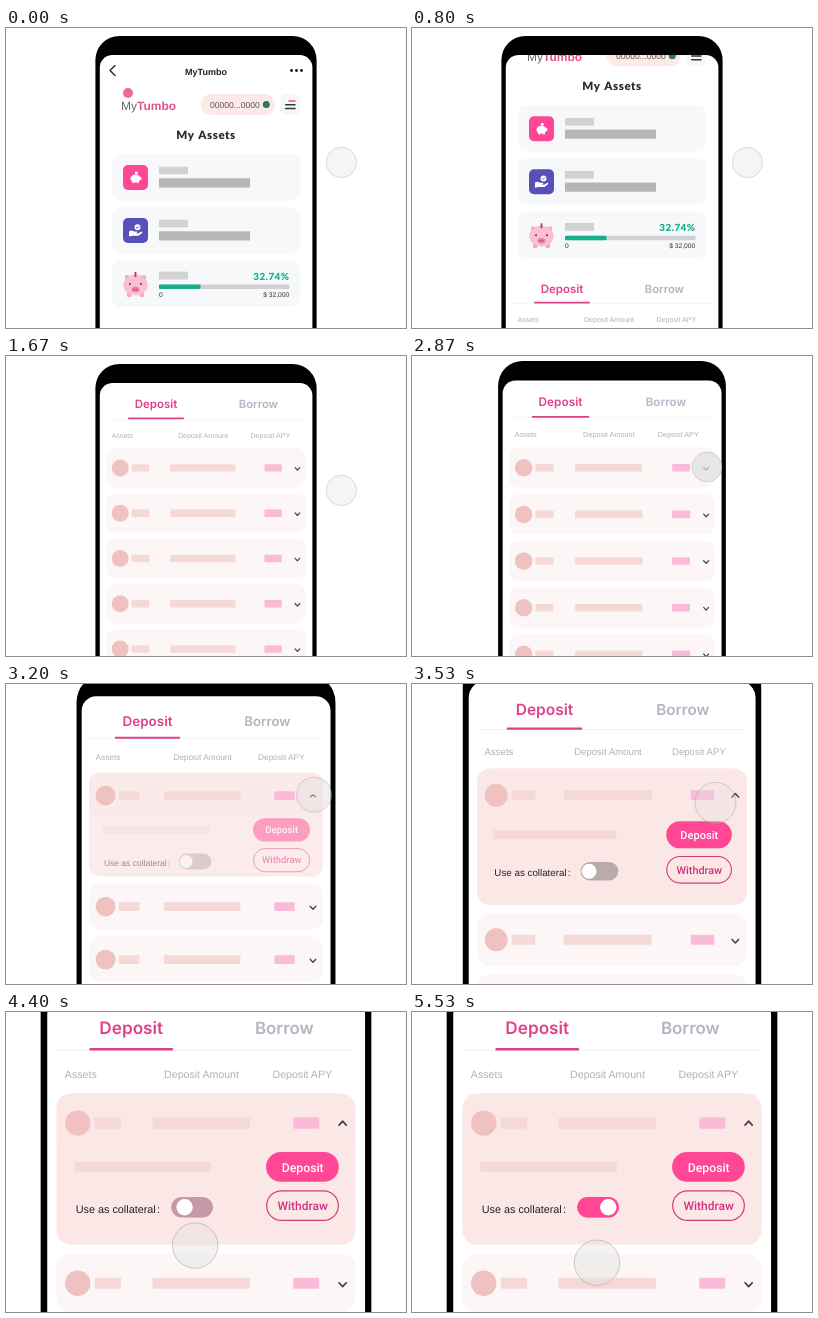
Recreate the animation shown at these times as an HTML page. Size 400x300 px, loop 5.99 s.

```html
<!DOCTYPE html>
<html lang="en">
<head>
<meta charset="utf-8">
<title>Savings app walkthrough</title>
<style>
  html, body { margin: 0; width: 100%; height: 100%; overflow: hidden; background: #fff; }
  svg { display: block; width: 400px; height: 300px; text-rendering: geometricPrecision; }
  text { font-family: "Liberation Sans", Arial, sans-serif; }
  .round { font-family: Lato, sans-serif; font-weight: 900; }
  .tab { font-family: Inter, sans-serif; font-weight: 600; }
  .button { font-family: Roboto, sans-serif; font-weight: 500; }
  .mid { text-anchor: middle; }
  .end { text-anchor: end; }
  .line { fill: none; stroke-linecap: round; stroke-linejoin: round; }
</style>
</head>
<body>
<svg viewBox="0 0 400 300">
  <defs><clipPath id="screen"><rect x="93.800" y="27" width="212.6" height="400" rx="12.5"/></clipPath></defs>
  <g id="camera">
    <rect x="89.4" y="8" width="221.2" height="440" rx="24"/>
    <rect x="93.800" y="27" width="212.6" height="400" rx="12.5" fill="#fff"/>
    <g clip-path="url(#screen)"><g id="page"></g></g>
    <circle id="cursor" stroke="#999" stroke-opacity=".6" stroke-width=".55"/>
  </g>
</svg>
<script>
const $ = id => document.getElementById(id);
const set = (id, attrs) => { for (const k in attrs) $(id).setAttribute(k, attrs[k]); };
const box = (x, y, w, h, fill, r = 0, more = '') =>
  `<rect x="${x}" y="${y}" width="${w}" height="${h}" rx="${r}" fill="${fill}" ${more}/>`;
const dot = (x, y, r, fill) => `<circle cx="${x}" cy="${y}" r="${r}" fill="${fill}"/>`;
const oval = (x, y, rx, ry, fill) => `<ellipse cx="${x}" cy="${y}" rx="${rx}" ry="${ry}" fill="${fill}"/>`;
const text = (x, y, size, fill, str, cls = '', more = '') =>
  `<text x="${x}" y="${y}" font-size="${size}" fill="${fill}" class="${cls}" ${more}>${str}</text>`;
const line = (d, color, w) => `<path class="line" d="${d}" stroke="${color}" stroke-width="${w}"/>`;
const at = (x, y, body, id = '') => `<g id="${id}" transform="translate(${x} ${y})">${body}</g>`;

const PINK = '#ff4796', GREEN = '#14b18a', BOLD = 'font-weight="bold"';
const ROW_H = 39.4, PITCH = 45.3, GROW = 61.8, ROWS = 6;

const header =
  line('M109 37.5l-5 5 5 5', '#222', 1.3) +
  text(200, 47, 9, '#222', 'MyTumbo', 'mid', BOLD) +
  [285.5, 290.5, 295.5].map(x => dot(x, 42.5, 1.4, '#111')).join('') +
  dot(122, 65, 5, '#f06a9f') +
  text(115, 81.5, 12, '#666', `My<tspan fill="#e8508f" ${BOLD}>Tumbo</tspan>`) +
  box(194.5, 66, 74.5, 21, '#fde9e7', 10.5) +
  text(204, 79.6, 8.5, '#555', '00000...0000') +
  dot(260.3, 76.5, 3.5, '#2f7566') +
  box(274.5, 66, 19.5, 21, '#f6f7f9', 5) +
  line('M283 73h6', '#e0508f', 1.5) +
  line('M279.7 76.8h9.3M279.7 80.6h9.3', '#333', 1.5) +
  text(200, 111, 11.5, '#2b2b2b', 'My Assets', 'round mid', 'letter-spacing=".55" word-spacing="1.4"');

const bankIcon = at(129.5, 149.5,
  oval(0, 1, 5, 3.9, '#fff') + dot(.8, -4.6, 1.5, '#fff') +
  box(-3.2, 3, 2, 2.6, '#fff') + box(1.4, 3, 2, 2.6, '#fff') +
  box(3.5, -.5, 2.3, 2.8, '#fff', .6));

const handIcon = at(129.5, 202.5,
  dot(2, -3.2, 3, '#fff') + line('M.8-3.2l1 1 1.6-1.8', '#5650b8', .8) +
  `<path d="M-6.5 1q3-2 5 0h3q1 1-1 1.7l2 .2 3.5-2q1.5 0 .5 1.5l-3.5 2.800h-6l-3.5.8z" fill="#fff"/>`);

const pig = at(129.5, 257,
  `<path d="M-10.500-5l.5-5 5 1zM10.500-5l-.5-5-5 1z" fill="#f4a0b8"/>` +
  box(-8.500, 6, 4.500, 6, '#f4a9bd', 1.5) + box(4, 6, 4.500, 6, '#f4a9bd', 1.5) +
  oval(0, 0, 12.2, 10.4, '#fabfd0') +
  box(-.9, -13, 1.8, 5, '#a53e58', .6) +
  dot(-5.5, -1, 1, '#5b3340') + dot(5.5, -1, 1, '#5b3340') +
  oval(0, 4.5, 3.9, 2.7, '#ee7b9c') + dot(-1.3, 4.5, .7, '#a53e58') + dot(1.3, 4.5, .7, '#a53e58'));

const card = y => box(106, y, 188, 46.5, '#f7f8fa', 9);
const iconCard = (y, color) => card(y) +
  box(117, y + 11, 25, 25, color, 5) +
  box(153, y + 12.7, 29, 7.6, '#d2d2d2') +
  box(153, y + 24.3, 91, 9.2, '#b6b6b6');

const cards =
  iconCard(126, PINK) + bankIcon +
  iconCard(179, '#5650b8') + handIcon +
  card(232.5) + pig +
  box(153, 243.7, 29, 7.8, '#d2d2d2') +
  text(283.5, 252, 9.8, GREEN, '32.74%', 'round end', 'letter-spacing=".5"') +
  box(153, 256.6, 130.5, 4.5, '#d0d0d0', 1) +
  box(153, 256.6, 41.5, 4.5, GREEN, 1) +
  text(153, 268.6, 6.7, '#333', '0') +
  text(283.3, 268.6, 6.7, '#333', '$ 32,000', 'end');

const row = i => at(0, 92 + i * PITCH,
  box(100, 0, 200, ROW_H, '#fdf6f6', 9.5) +
  (i ? '' : box(100, 0, 200, ROW_H, '#fbe8e6', 9.5, 'id="open"')) +
  dot(114.2, 19.8, 8.5, '#efc1c1') +
  box(125.6, 16.1, 17.6, 7.4, '#f5d9d7', .8) +
  box(164.2, 16.1, 65.2, 7.4, '#f5d9d7', .8) +
  box(258.4, 16.1, 17.4, 7.4, '#fbbad8', .8) +
  at(291.4, 20.8, `<path id="arrow${i}" class="line" stroke="#444" stroke-width="1.15"/>`), 'row' + i);

const details =
  box(112, 137.8, 91.3, 6.6, '#f5d9d7', .6) +
  text(112.8, 171.8, 7.25, '#222', 'Use as collateral<tspan dx=".8">:</tspan>') +
  box(176.7, 161.2, 28, 13.7, '#b9abab', 6.85) +
  box(176.7, 161.2, 28, 13.7, PINK, 6.85, 'id="track"') +
  `<circle id="knob" cy="168.1" r="5.5" fill="#fff"/>` +
  box(240.2, 131.1, 48.6, 20, PINK, 10) +
  text(264.7, 144.2, 8.2, '#fff', 'Deposit', 'button mid') +
  box(240.6, 157.1, 47.9, 19.8, 'none', 9.9, 'stroke="#d0387f" stroke-width=".8"') +
  text(264.7, 169.8, 8, '#d0307f', 'Withdraw', 'button mid');

const list =
  text(150, 52.3, 11.5, '#e0408a', 'Deposit', 'tab mid') +
  text(252.4, 52.3, 11.3, '#b3b5c2', 'Borrow', 'tab mid') +
  box(100, 62.8, 200, .5, '#ececf0') +
  box(122, 61.5, 56, 1.7, '#e0408a', .8) +
  text(105.6, 81.8, 7.1, '#afb1bc', 'Assets') +
  text(197, 81.8, 7.1, '#afb1bc', 'Deposit Amount', 'mid') +
  text(264.4, 81.8, 7.1, '#afb1bc', 'Deposit APY', 'mid') +
  Array.from({ length: ROWS }, (_, i) => row(i)).join('') +
  `<g id="details">${details}</g>`;

$('page').innerHTML = header + cards + at(0, 261, list);

const LOOP = 5990, FPS = 15;
const mix = (a, b, k) => a + (b - a) * k;
const ease = (t, from, to) => {
  const p = Math.min(1, Math.max(0, (t - from) / (to - from)));
  return p * p * (3 - 2 * p);
};

function draw(t) {
  const zoom = mix(1, 1.495, ease(t, 2665, 4020));
  set('camera', { transform: `translate(200 113.2) scale(${zoom}) translate(-200 -113.2)` });
  set('page', { transform: `translate(0 ${-261 * ease(t, 464, 1680)})` });

  const open = ease(t, 2950, 3300);
  set('open', { height: ROW_H + GROW * open, 'fill-opacity': open });
  set('details', { opacity: ease(t, 3080, 3330) });
  for (let i = 0; i < ROWS; i++) {
    if (i) set('row' + i, { transform: `translate(0 ${92 + i * PITCH + GROW * open})` });
    const turn = i ? 0 : open, h = mix(1.3, -1.3, turn);
    set('arrow' + i, { d: `M-2.4 ${-h - turn}l2.4 ${2 * h}l2.4 ${-2 * h}` });
  }

  const on = ease(t, 4290, 4690);
  set('track', { 'fill-opacity': on });
  set('knob', { cx: mix(183, 197.5, on) });

  // Cursor: to the arrow, on to the switch, then away below it.
  const a = ease(t, 1820, 2550), b = ease(t, 3350, 4060), c = ease(t, 4200, 4530);
  const press = ease(t, 2600, 2800) - ease(t, 3050, 3300);
  set('cursor', {
    cx: 335.4 - 43.1 * a - 94.3 * b - 8 * c,
    cy: 134.5 - 23.5 * a + 60.7 * b ** 1.25 + 33.5 * c,
    r: 15.2 - .7 * press,
    fill: `rgba(222,222,222,${.3 + .42 * press + .1 * ease(t, 3900, 4250)})`
  });
}

function tick() {
  const t = performance.now() % LOOP;
  draw(Math.floor(t * FPS / 1000 + .06) * 1000 / FPS);
  requestAnimationFrame(tick);
}
tick();
</script>
</body>
</html>
```
